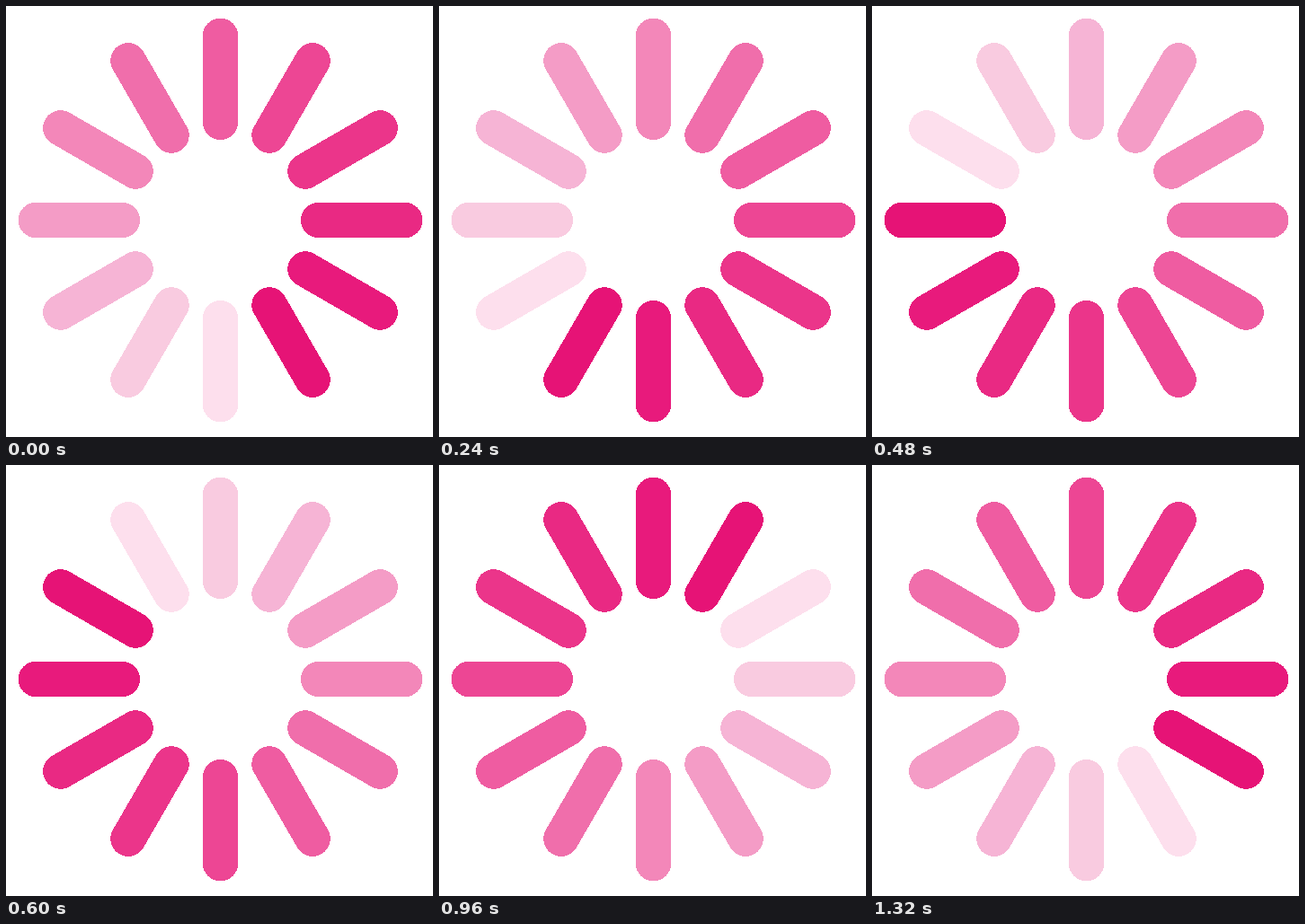
Write an HTML page that moves like this. It is 475 px wide and 480 px high and loops after 1.44 s.

```html
<!DOCTYPE html>
<html lang="en">
<head>
<meta charset="utf-8">
<title>Spinner</title>
<style>
  html, body { margin: 0; width: 100%; height: 100%; overflow: hidden; background: #fff; }
  svg { display: block; }
  line { stroke-width: 39.4; stroke-linecap: round; shape-rendering: crispEdges; }
</style>
</head>
<body>
<svg width="475" height="480" viewBox="0 0 475 480"></svg>
<script>
const STEP = 120, COUNT = 12, CENTER = 238.5;
// Darkest to lightest
const SHADES = ['#e61376', '#e81a7c', '#e92983', '#eb358a', '#ed4694', '#ef5ca1',
                '#f06eab', '#f387b9', '#f49cc6', '#f6b4d5', '#f9cbe0', '#fddfed'];
const svg = document.querySelector('svg');

// Bars are numbered clockwise from the top
const bars = SHADES.map((_, i) => {
  const bar = document.createElementNS('http://www.w3.org/2000/svg', 'line');
  const attrs = {
    x1: CENTER, x2: CENTER, y1: CENTER - 109, y2: CENTER - 205.2,
    transform: `rotate(${i * 360 / COUNT} ${CENTER} ${CENTER})`
  };
  for (const name in attrs) bar.setAttribute(name, attrs[name]);
  return svg.appendChild(bar);
});

const start = performance.now();

function draw(now) {
  const step = Math.floor(Math.max(0, now - start) / STEP) % COUNT;
  const head = step + 5;
  bars.forEach((bar, i) => bar.setAttribute('stroke', SHADES[(head - i + COUNT) % COUNT]));
  requestAnimationFrame(draw);
}
draw(start);
</script>
</body>
</html>
```
